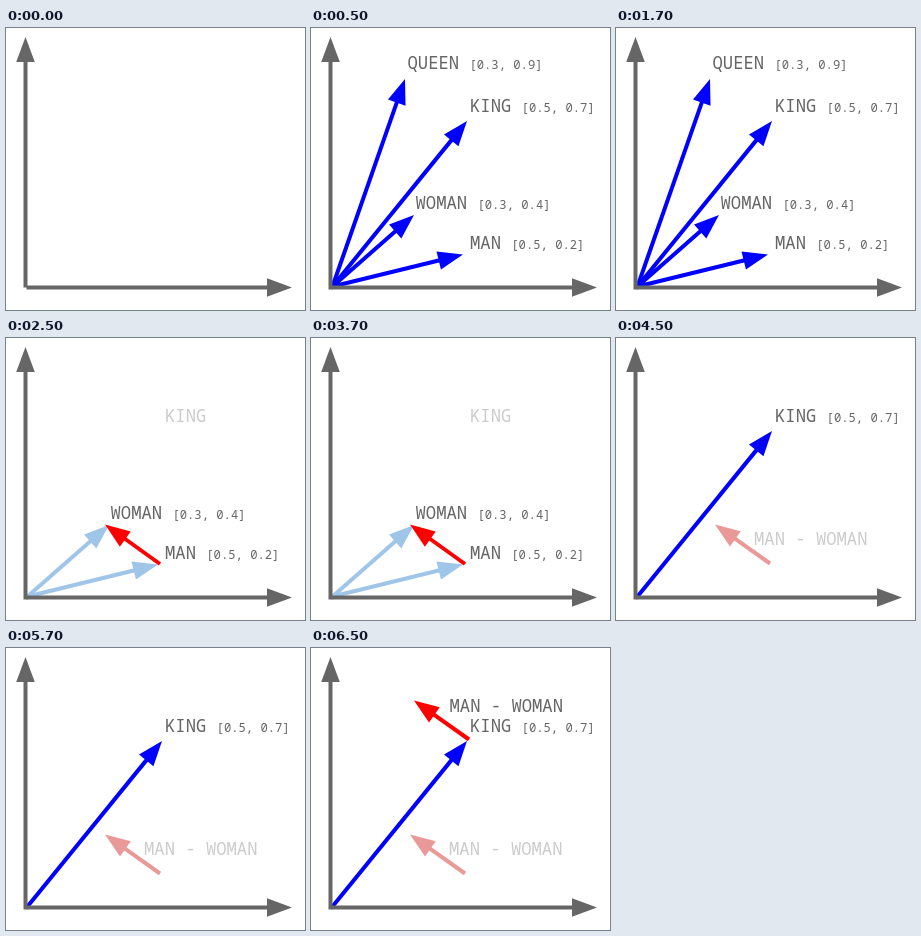
An HTML page with a canvas that plays this animation: 299 by 282 pixels, repeating every 8000 ms.

```html
<!DOCTYPE html>
<html lang="en">
<head>
<meta charset="utf-8">
<title>Word vectors</title>
<style>
  html, body { margin: 0; width: 100%; height: 100%; overflow: hidden; background: #fff; }
  canvas { display: block; }
</style>
</head>
<body>
<canvas id="stage" width="299" height="282"></canvas>
<script>
const ctx = document.getElementById('stage').getContext('2d');
const LOOP = 8000;
const GRAY = '#666', FADED = '#ccc', BLUE = '#00f', PALE_BLUE = '#9fc5e8';
const RED = '#f00', PALE_RED = '#ea9999';
const MONO = '"Noto Sans Mono", "DejaVu Sans Mono", monospace';
const ORIGIN = [21.5, 258.5];

const words = {
  QUEEN: { tip: [94, 51], at: [96.5, 40.5], vec: '[0.3, 0.9]' },
  KING: { tip: [156, 93], at: [159, 83.5], vec: '[0.5, 0.7]' },
  WOMAN: { tip: [103, 187], at: [104.5, 181], vec: '[0.3, 0.4]' },
  MAN: { tip: [152, 226.5], at: [159, 220.5], vec: '[0.5, 0.2]' }
};

function arrow([x0, y0], [x1, y1], color) {
  const len = Math.hypot(x1 - x0, y1 - y0), head = 25, half = 9.3;
  ctx.save();
  ctx.translate(x0, y0);
  ctx.rotate(Math.atan2(y1 - y0, x1 - x0));
  ctx.fillStyle = color;
  ctx.fillRect(0, -2, len - head + 1, 4);
  ctx.beginPath();
  ctx.moveTo(len, 0);
  ctx.lineTo(len - head, -half);
  ctx.lineTo(len - head, half);
  ctx.fill();
  ctx.restore();
}

function text(str, x, y, color = GRAY, size = 17.2) {
  ctx.font = `${size}px ${MONO}`;
  ctx.fillStyle = color;
  ctx.fillText(str, x, y);
}

function label(name) {
  const { at: [x, y], vec } = words[name];
  text(name, x, y);
  text(vec, x + ctx.measureText(name + ' ').width, y, GRAY, 12.2);
}

const ray = (name, color) => arrow(ORIGIN, words[name].tip, color);

function axes(joined) {
  arrow([19.5, joined ? 261.5 : 259.5], [19.5, 9], GRAY);
  arrow([20.5, 259.5], [286, 259.5], GRAY);
}

function allWords() {
  for (const name in words) {
    ray(name, BLUE);
    label(name);
  }
}

function difference() {
  for (const name of ['WOMAN', 'MAN']) {
    ray(name, PALE_BLUE);
    label(name);
  }
  arrow([154, 226], [99, 186.5], RED);
  text('KING', ...words.KING.at, FADED);
}

function kingAndOffset() {
  ray('KING', BLUE);
  label('KING');
  arrow([154, 225.5], [99, 186.5], PALE_RED);
  text('MAN - WOMAN', 138, 206.5, FADED);
}

function shifted() {
  kingAndOffset();
  arrow([158, 91.5], [103, 52.5], RED);
  text('MAN - WOMAN', 138.5, 63.5);
}

const scenes = [
  [6500, shifted],
  [4500, kingAndOffset],
  [2500, difference],
  [500, allWords],
  [0, () => {}]
];

const start = performance.now();

function frame() {
  const t = (performance.now() - start) % LOOP;
  ctx.fillStyle = '#fff';
  ctx.fillRect(0, 0, 299, 282);
  scenes.find(([from]) => t >= from)[1]();
  axes(t >= 500);
  requestAnimationFrame(frame);
}
frame();
</script>
</body>
</html>
```
